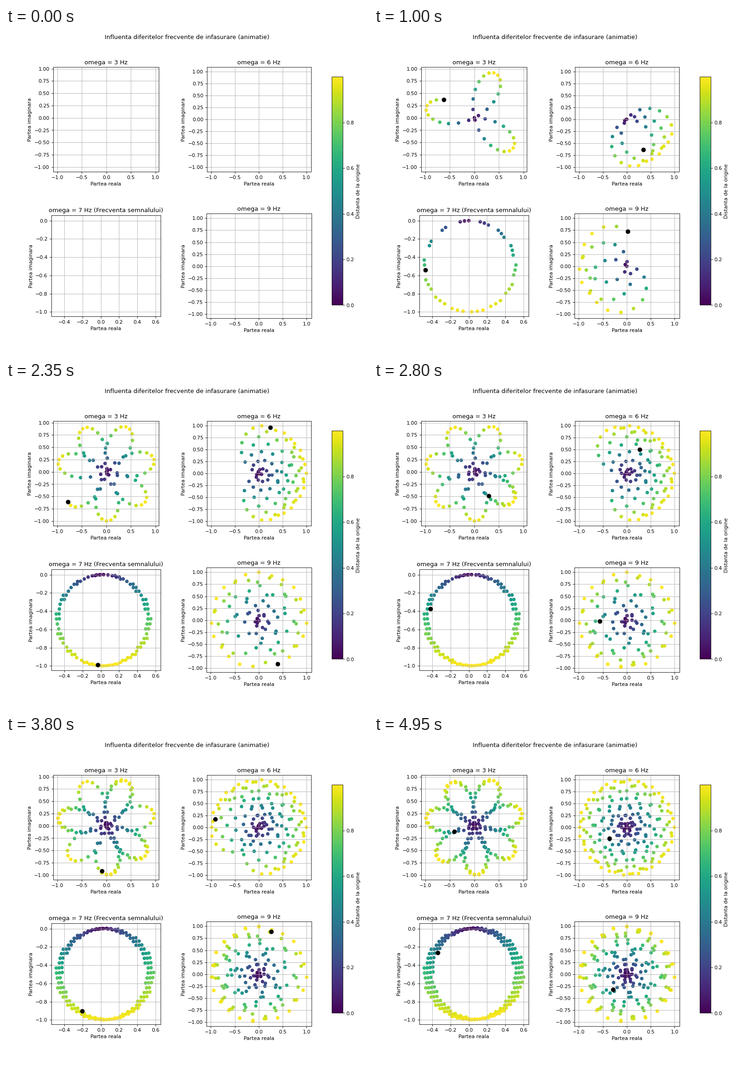
Animation of 789x710 px, one loop 5000 ms. Source, as a matplotlib script:

```python
import numpy as np
import matplotlib.pyplot as plt
from matplotlib.animation import FuncAnimation

SAMPLES = 200
STEP = 2            # samples added per frame
SIGNAL_HZ = 7
WINDING_HZ = (3, 6, 7, 9)

n = np.arange(SAMPLES)
t = np.linspace(0, 1, SAMPLES)
signal = np.sin(2 * np.pi * SIGNAL_HZ * t)
distance = np.abs(signal)


def wind(omega):
    """Wrap the signal around the origin; returns one (x, y) row per sample."""
    z = signal * np.exp(-2j * np.pi * omega * n / SAMPLES)
    return np.column_stack((z.real, z.imag))


# 789 x 710 pixels
fig, axes = plt.subplots(2, 2, figsize=(10, 9), dpi=78.9)
fig.subplots_adjust(left=0.125, right=0.85, bottom=0.11, top=0.88,
                    wspace=0.4, hspace=0.4)
fig.suptitle("Influenta diferitelor frecvente de infasurare (animatie)")


def make_panel(ax, omega):
    points = wind(omega)
    dots = ax.scatter(*points.T, c=distance, cmap="viridis")
    head, = ax.plot([], [], "ko", markersize=8)
    note = " (Frecventa semnalului)" if omega == SIGNAL_HZ else ""
    ax.set_title(f"omega = {omega} Hz{note}")
    ax.set_xlabel("Partea reala")
    ax.set_ylabel("Partea imaginara")
    ax.set_aspect("equal")
    ax.grid(True)
    # Fix the limits before the dots are hidden
    ax.set_xlim(ax.get_xlim())
    ax.set_ylim(ax.get_ylim())
    return points, dots, head


panels = [make_panel(ax, omega) for ax, omega in zip(axes.flat, WINDING_HZ)]

cax = fig.add_axes([0.9, 0.15, 0.03, 0.7])
fig.colorbar(panels[0][1], cax=cax, label="Distanta de la origine")


def update(frame):
    count = STEP * frame
    artists = []
    for points, dots, head in panels:
        dots.set_offsets(points[:count])
        dots.set_array(distance[:count])
        head.set_data(*points[max(count - 1, 0):count].T)
        artists += [dots, head]
    return artists


def reset():
    return update(0)


anim = FuncAnimation(fig, update, frames=SAMPLES // STEP, init_func=reset,
                     interval=50, repeat=True, repeat_delay=0)
plt.show()
```
